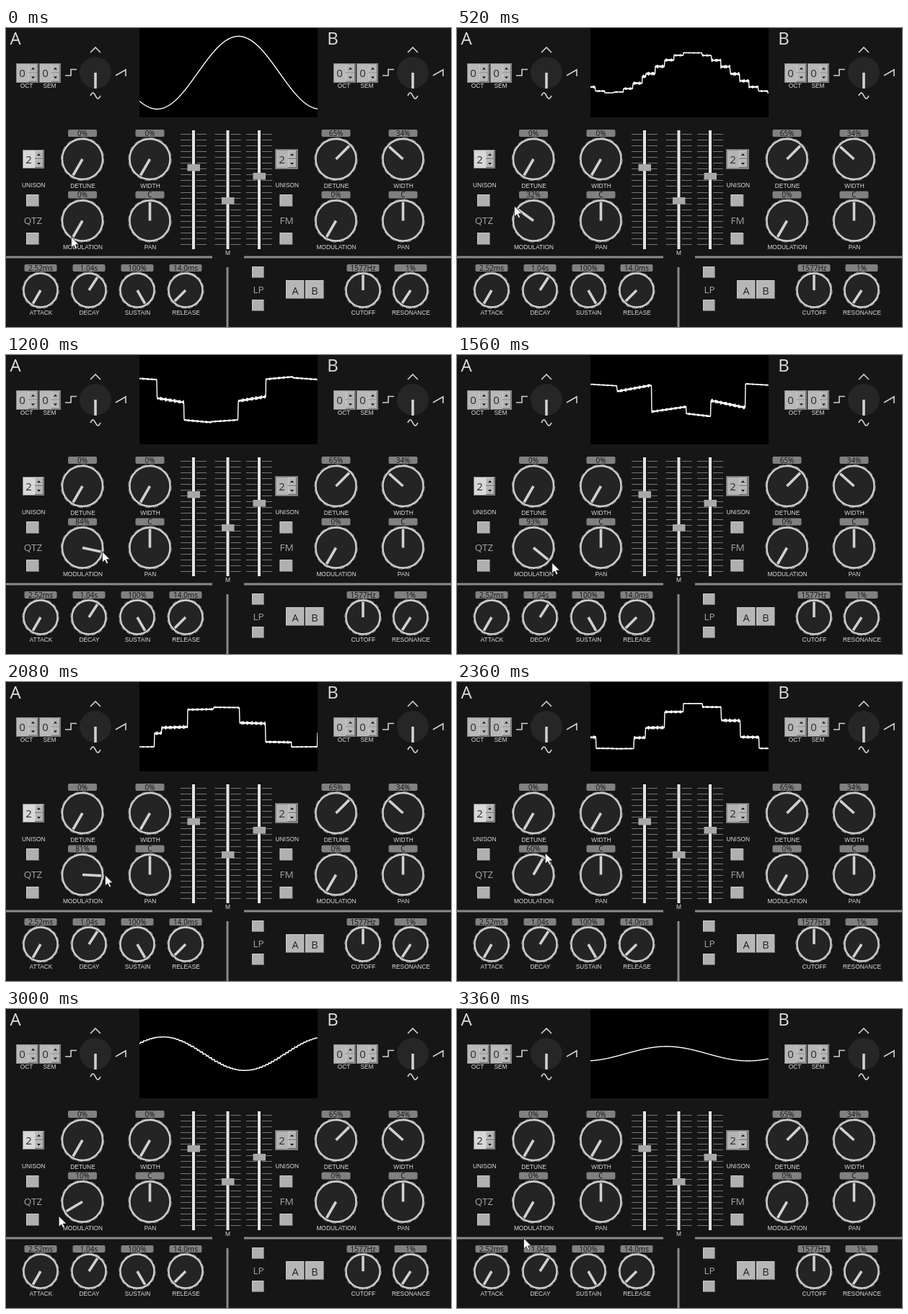
Write an HTML page with a canvas that moves like this. It is 617 px wide and 415 px high and loops after 3.4 s.

```html
<!DOCTYPE html>
<html>
<head>
<meta charset="utf-8">
<style>
html, body { margin: 0; width: 617px; height: 415px; overflow: hidden; background: #161616; }
canvas { display: block; }
</style>
</head>
<body>
<canvas id="stage" width="617" height="415"></canvas>
<script>
const g = document.getElementById('stage').getContext('2d');
const UI = '"Open Sans", "Noto Sans", sans-serif';
const CAPS = '"Liberation Sans", Arial, sans-serif';
const LOOP = 3400, STEP = 40, CYCLE = 226, RAD = Math.PI / 180;

// time, modulation %, cursor angle, cursor radius, wave start x, amplitude, hold width, tilt
const KEYS = [
  [0, 0, -145, 28, 266, 50.5, 0, 0],
  [520, 32, -53.5, 33.6, 262, 28, 13, 0],
  [1200, 84, 102.5, 27.7, 323, 34, 37.5, 0.16],
  [1560, 93, 130, 33, 352, 23, 48, -0.21],
  [2080, 81, 92, 31, 442, 29, 36, 0.03],
  [2640, 39, -36, 36, 533, 36, 16.5, 0],
  [3120, 0, -150, 40, 635, 19, 0, 0],
  [3360, 0, -164.7, 53, 686, 10, 0, 0]
];

function pose(t) {
  let i = 1;
  while (i < KEYS.length - 1 && KEYS[i][0] < t) i++;
  const a = KEYS[i - 1], b = KEYS[i], f = Math.min(1, (t - a[0]) / (b[0] - a[0]));
  return a.map((v, n) => v + (b[n] - v) * f);
}

function text(s, x, y, size, color = '#dadada', font = CAPS) {
  g.font = size + 'px ' + font;
  g.fillStyle = color;
  g.textAlign = 'center';
  g.fillText(s, x, y);
}

function box(x, y, w, h, color) {
  g.fillStyle = color;
  g.fillRect(x, y, w, h);
}

function disc(x, y, r, color) {
  g.fillStyle = color;
  g.beginPath();
  g.arc(x, y, r, 0, 7);
  g.fill();
}

function line(points, width, color) {
  g.lineWidth = width;
  g.strokeStyle = color;
  g.beginPath();
  points.forEach(p => g.lineTo(p[0], p[1]));
  g.stroke();
}

function bevel(x, y, w, h, color = '#b0b0b0') {
  box(x, y, w, h, '#6c6c6c');
  box(x, y, w - 1, h - 1, '#cccccc');
  box(x + 1, y + 1, w - 2, h - 2, color);
}

function spinner(x, y, w, h, value, field) {
  box(x, y, w, h, '#8a8a8a');
  box(x + 1, y + 1, 16, h - 2, field);
  for (const s of [-1, 1]) {
    const cy = y + h / 2 + s * 6, cx = x + w - 7.5;
    bevel(x + 17, cy - 6, w - 18, 12, '#b4b4b4');
    g.fillStyle = '#111';
    g.beginPath();
    g.moveTo(cx - 2.5, cy - s);
    g.lineTo(cx + 2.5, cy - s);
    g.lineTo(cx, cy + s * 1.8);
    g.fill();
  }
  text(value, x + 8.5, y + h / 2 + 5.5, 15, '#2a2a2a', UI);
}

function pointer(x, y, len, angle) {
  const a = angle * RAD;
  line([[x, y], [x + len * Math.sin(a), y - len * Math.cos(a)]], 3.6, '#d0d0d0');
}

function tag(s, x, y, w) {
  g.fillStyle = '#808080';
  g.beginPath();
  g.roundRect(x - w / 2, y, w, 10, 2);
  g.fill();
  text(s, x, y + 8.8, 10, '#111', UI);
}

function knob(x, y, r, angle, value, label) {
  disc(x, y, r - 1, '#242424');
  g.strokeStyle = '#cdcdcd';
  g.lineWidth = 2.6;
  g.beginPath();
  g.arc(x, y, r - 1.9, 0, 7);
  g.stroke();
  g.strokeStyle = '#909090';
  g.lineWidth = 1.2;
  for (let i = 0; i < 16; i++) {
    g.beginPath();
    g.arc(x, y, r - 0.4, i * Math.PI / 8, (i + 0.6) * Math.PI / 8);
    g.stroke();
  }
  pointer(x, y, r - 4, angle);
  const big = r > 27;
  tag(value, x, big ? y - 41 : y - 36, big ? 40 : 45);
  text(label, x + 0.5, y + (big ? 39.5 : 34), 8.4);
}

function oscillator(dx, name) {
  const x = dx + 124, c = '#d0d0d0', sine = [];
  text(name, dx + 13, 23, 24, '#e0e0e0', UI);
  spinner(dx + 14, 49, 31, 27, '0', '#b8b8b8');
  spinner(dx + 46, 49, 30, 27, '0', '#b8b8b8');
  text('OCT', dx + 28.5, 83, 8.4);
  text('SEM', dx + 60.5, 83, 8.4);
  disc(x, 62, 22, '#262626');
  pointer(x, 62, 22, 180);
  line([[x - 7, 34], [x, 27], [x + 7, 34]], 1.6, c);
  line([[dx + 82, 66], [dx + 90, 66], [dx + 90, 57.5], [dx + 98, 57.5]], 1.6, c);
  line([[dx + 152, 66], [dx + 166, 58], [dx + 166, 67]], 1.6, c);
  for (let i = -7; i <= 7; i++) sine.push([x + i, 94 + 4 * Math.sin(i * Math.PI / 7)]);
  line(sine, 1.6, c);
}

function slider(x, thumbY) {
  for (let i = 0; i < 20; i++) {
    const y = Math.round(147 + i * 8.05);
    box(x - 18, y, 15, 1, '#777');
    box(x + 4, y, 14, 1, '#777');
  }
  box(x - 2, 142, 4, 165, '#e4e4e4');
  box(x - 8.5, thumbY, 17.5, 9.5, '#a8a8a8');
}

function panel(mod) {
  box(0, 0, 617, 415, '#161616');
  oscillator(0, 'A');
  oscillator(440, 'B');

  spinner(23, 169, 30, 26, '2', '#d8d8d8');
  box(373, 168, 32, 28, '#777');
  spinner(374, 169, 30, 26, '2', '#b4b4b4');
  for (const [x, name] of [[37.5, 'QTZ'], [389, 'FM']]) {
    text('UNISON', x + 0.8, 221, 8.4);
    bevel(x - 9.5, 231, 18, 17);
    bevel(x - 9.5, 284, 18, 17);
    text(name, x, 272, 13.5, '#a2a6aa', UI);
  }

  knob(106, 182, 30, -150, '0%', 'DETUNE');
  knob(199.5, 182, 30, -150, '0%', 'WIDTH');
  knob(106, 267.5, 30, mod * 3 - 150, Math.round(mod) + '%', 'MODULATION');
  knob(199.5, 267.5, 30, 0, 'C', 'PAN');
  knob(457.5, 182, 30, 45, '65%', 'DETUNE');
  knob(550.5, 182, 30, -48, '34%', 'WIDTH');
  knob(457.5, 267.5, 30, -150, '0%', 'MODULATION');
  knob(550.5, 267.5, 30, 0, 'C', 'PAN');

  slider(260, 189);
  slider(307.5, 235);
  slider(351, 201);
  text('M', 307.5, 315, 8.4);

  box(0, 316.5, 286, 3, '#8a8a8a');
  box(330, 316.5, 287, 3, '#8a8a8a');
  box(305.5, 332, 3, 83, '#8a8a8a');

  knob(48, 364, 25.5, -150, '2.52ms', 'ATTACK');
  knob(115, 364, 25.5, 33, '1.04s', 'DECAY');
  knob(182, 364, 25.5, 150, '100%', 'SUSTAIN');
  knob(249, 364, 25.5, -135, '14.0ms', 'RELEASE');
  knob(495, 364, 25.5, 0, '1577Hz', 'CUTOFF');
  knob(561, 364, 25.5, -147, '1%', 'RESONANCE');

  bevel(341, 331, 17, 16);
  bevel(341, 377, 17, 16);
  text('LP', 350, 368, 13.5, '#a2a6aa', UI);
  bevel(388, 350, 26, 26, '#b6b6b6');
  bevel(415, 350, 26, 26, '#b6b6b6');
  text('A', 401, 369.5, 14.5, '#222', UI);
  text('B', 428, 369.5, 14.5, '#222', UI);
}

// A sine held in steps; the hold restarts with every cycle.
function scope(start, amp, hold, tilt) {
  box(185, 0, 247, 124, '#000');
  const points = [], stepped = hold >= 1;
  for (let x = 185; x <= 432; x += 0.5) {
    const d = ((x - start) % CYCLE + CYCLE) % CYCLE;
    const held = stepped ? Math.floor(d / hold) * hold : d;
    const phase = held / CYCLE * 2 * Math.PI - (stepped ? 0.05 : 0), c = Math.cos(phase);
    const beads = Math.sin(x * 5) * (0.7 + 0.3 * Math.sin(x));
    const fuzz = Math.min(1, hold / 13) * (0.3 + 2.6 * Math.abs(c)) * beads;
    points.push([x, 62 - amp * Math.sin(phase) - tilt * c * (d - held) + fuzz]);
  }
  g.save();
  g.beginPath();
  g.rect(185, 0, 247, 124);
  g.clip();
  g.lineJoin = 'bevel';
  line(points, 1.4, '#fff');
  g.restore();
}

function cursor(angle, r) {
  const a = angle * RAD;
  g.save();
  g.translate(106.5 + r * Math.sin(a), 267 - r * Math.cos(a));
  g.scale(0.93, 0.93);
  g.beginPath();
  [[0, 0], [0, 16], [3.8, 12.5], [6.3, 18], [8.8, 17], [6.4, 11.5], [11.5, 11.5]]
    .forEach(p => g.lineTo(p[0], p[1]));
  g.closePath();
  g.fillStyle = '#fff';
  g.fill();
  g.lineWidth = 0.8;
  g.strokeStyle = '#111';
  g.stroke();
  g.restore();
}

function draw(now) {
  const t = Math.floor(now % LOOP / STEP) * STEP;
  const [, mod, angle, r, start, amp, hold, tilt] = pose(t);
  panel(mod);
  scope(start, amp, hold, tilt);
  cursor(angle, r);
}

const begin = performance.now();
function tick() {
  draw(performance.now() - begin);
  requestAnimationFrame(tick);
}
tick();
</script>
</body>
</html>
```
